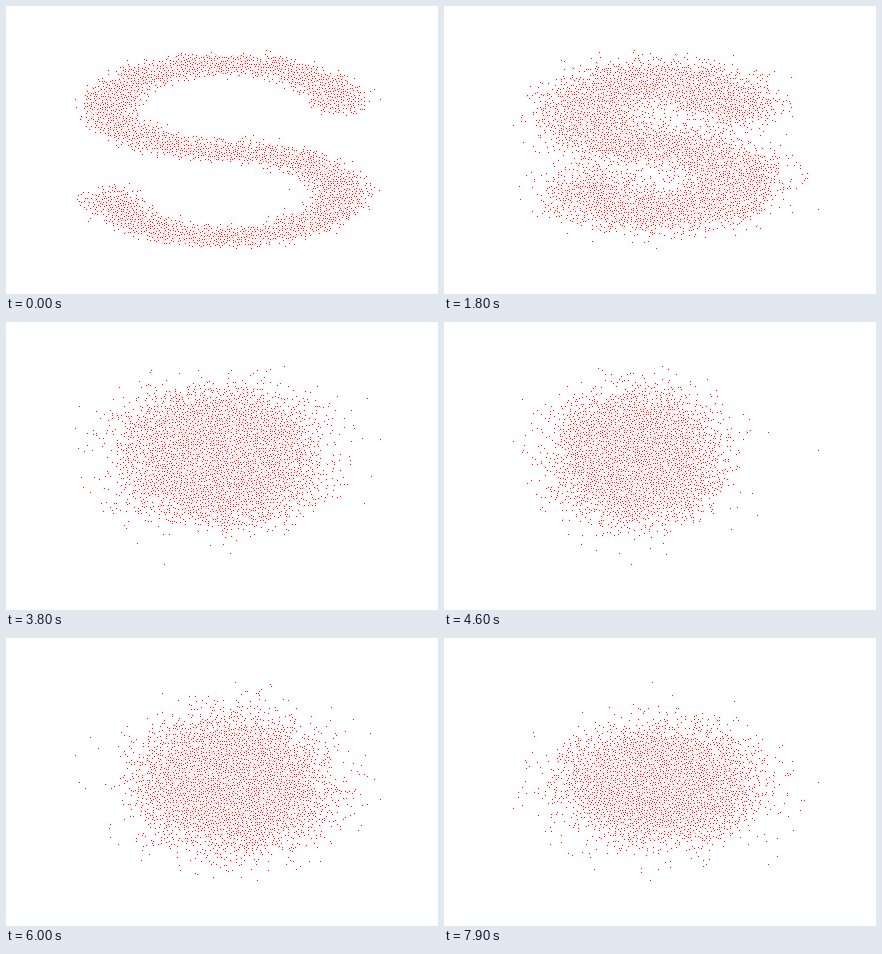
Write a matplotlib script that moves like this. It is 432 px wide and 288 px high and loops after 8 s.

```python
import numpy as np
import matplotlib.pyplot as plt
from matplotlib.animation import FuncAnimation

COUNT = 10_000   # points on the S-curve
STEPS = 100      # length of the full noise schedule
FRAMES = 80
MARGIN = 0.05

# S-curve with a little jitter, seen from the side
rng = np.random.default_rng(7)
t = 3 * np.pi * (rng.random(COUNT) - 0.5)
curve = np.column_stack([np.sin(t), np.sign(t) * (np.cos(t) - 1)])
curve = (curve + 0.1 * rng.standard_normal(curve.shape)) / 10

# Sigmoid noise schedule and the share of signal left at each step
ramp = np.linspace(-6, 6, STEPS)
beta = (0.5e-2 - 1e-5) / (1 + np.exp(-ramp)) + 1e-5
signal = np.cumprod(1 - beta)


def diffuse(step):
    """The curve after `step` steps of forward diffusion."""
    noise = np.random.default_rng(100 + step).standard_normal(curve.shape)
    return np.sqrt(signal[step]) * curve + np.sqrt(1 - signal[step]) * noise


def padded(values):
    low, high = values.min(), values.max()
    pad = MARGIN * (high - low)
    return low - pad, high + pad


fig = plt.figure(figsize=(6, 4), dpi=72, facecolor="white")
ax = fig.add_axes([0.125, 0.125, 0.775, 0.755])
ax.axis("off")
dots = ax.scatter(curve[:, 0], curve[:, 1], s=5, color="red",
                  edgecolor="white", linewidths=1.0)


def draw(frame):
    # the opening state is held for two frames
    points = diffuse(max(0, frame - 1))
    dots.set_offsets(points)
    ax.set_xlim(*padded(points[:, 0]))
    ax.set_ylim(*padded(points[:, 1]))
    return [dots]


anim = FuncAnimation(fig, draw, frames=FRAMES, init_func=lambda: draw(0),
                     interval=100, repeat=True, repeat_delay=0)
plt.show()
```
